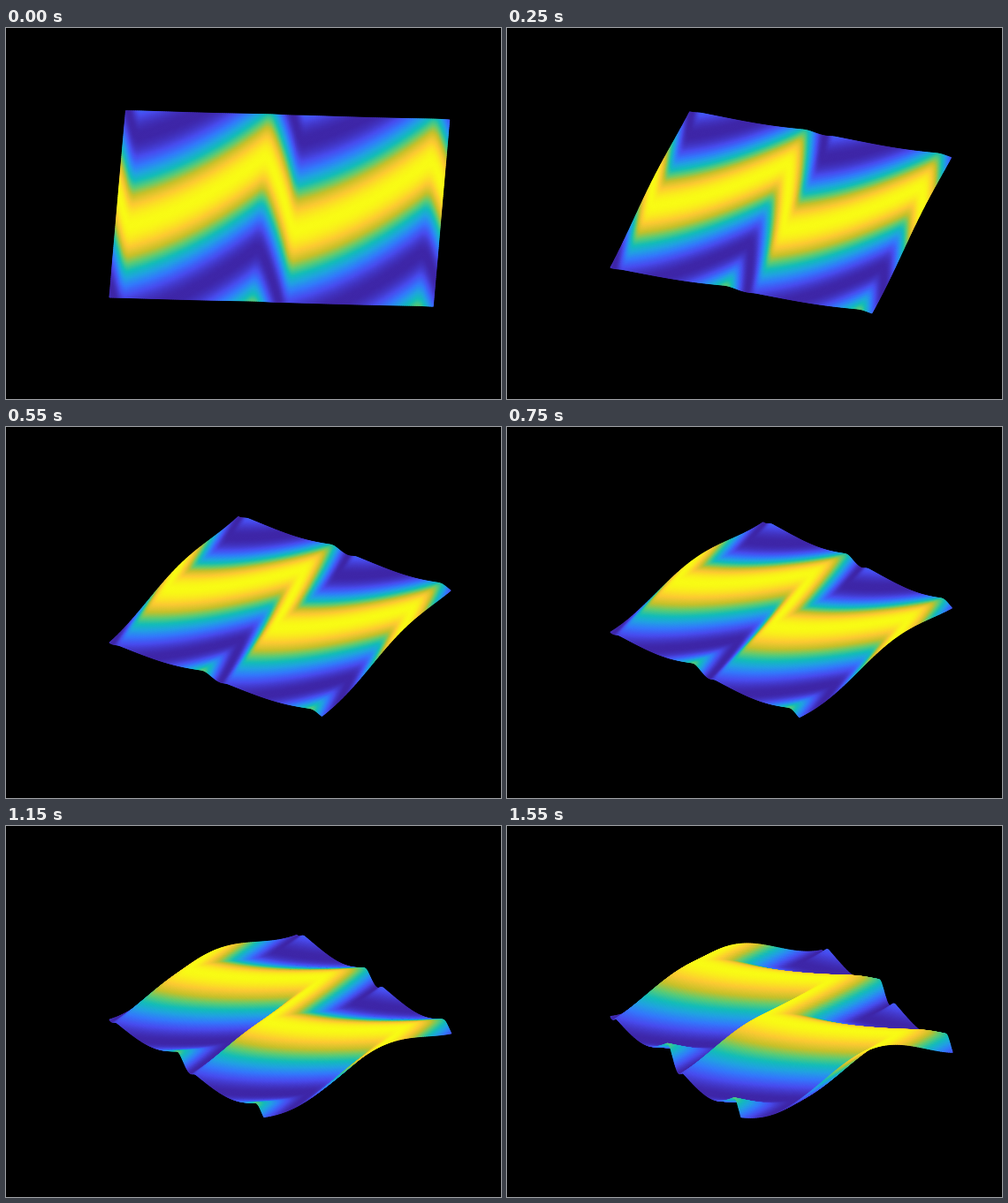
These frames come from a looping animation (560x420 px, 1.6 s). A matplotlib script:

```python
import numpy as np
import matplotlib.pyplot as plt
from matplotlib.animation import FuncAnimation
from matplotlib.colors import LinearSegmentedColormap

W, H, DPI = 560, 420, 100
FRAMES, INTERVAL = 32, 50
BOX_W, BOX_H = 434.0, 342.3        # screen area filled by the projected cube
CENTRE_X, CENTRE_Y = 290.6, 203.0
X_RANGE, Y_RANGE = (-0.4, 0.486), (-0.4, 0.4955)
Z_BASE, Z_AMP = -0.125, 0.16
WAVE_X, WAVE_Y = 0.51, 0.97        # wavelengths as fractions of the sheet

CMAP = LinearSegmentedColormap.from_list("sheet", [
    "#3e26a8", "#484df0", "#337afd", "#21a3e3", "#12beb9",
    "#5ccc76", "#c8c129", "#feca33", "#f9fb15"])


def skewed_saw(u):
    """Crest line: a slow bending rise, then a quick fall."""
    t = ((u - 0.037) / WAVE_X) % 1
    up = np.clip(t / 0.8, 0, 1)
    down = np.clip((t - 0.8) / 0.2, 0, 1)
    return 0.375 + 0.2 * (up + up ** 2) - 0.4 * down ** 1.25


def crest(u):
    """Crest line with its corners slightly rounded."""
    return np.mean([skewed_saw(u + d) for d in np.linspace(-0.013, 0.013, 9)], axis=0)


# Rows run from far to near so that nearer parts cover those behind.
u, v = np.meshgrid(np.linspace(0, 1, 200), np.linspace(1, 0, 110))
wave = np.cos(2 * np.pi * (v - crest(u)) / WAVE_Y)
px = X_RANGE[0] + u * (X_RANGE[1] - X_RANGE[0])
py = Y_RANGE[0] + v * (Y_RANGE[1] - Y_RANGE[0])


def project(step):
    """Screen position of the sheet seen from (step/20, -1, 2.5)."""
    side = step / 20
    dist = np.hypot(side, 1)
    s, c = side / dist, 1 / dist
    cot = dist / 2.5
    pz = Z_BASE + Z_AMP * step / FRAMES * wave
    sx = CENTRE_X + BOX_W * (c * px + s * py) / (c + s)
    sy = CENTRE_Y - BOX_H * (c * py - s * px + cot * pz) / (c + s + cot)
    return sx, sy


fig = plt.figure(figsize=(W / DPI, H / DPI), dpi=DPI, facecolor="black")
ax = fig.add_axes([0, 0, 1, 1])
ax.axis("off")
ax.set_autoscale_on(False)


def draw(i):
    for old in list(ax.collections):
        old.remove()
    sx, sy = project(i + 1)
    mesh = ax.pcolormesh(sx, sy, wave, cmap=CMAP, vmin=-1, vmax=1, shading="gouraud")
    ax.set_xlim(0, W)
    ax.set_ylim(H, 0)
    return [mesh]


anim = FuncAnimation(fig, draw, frames=FRAMES, interval=INTERVAL,
                     init_func=lambda: [], repeat=True, repeat_delay=0)
plt.show()
```
